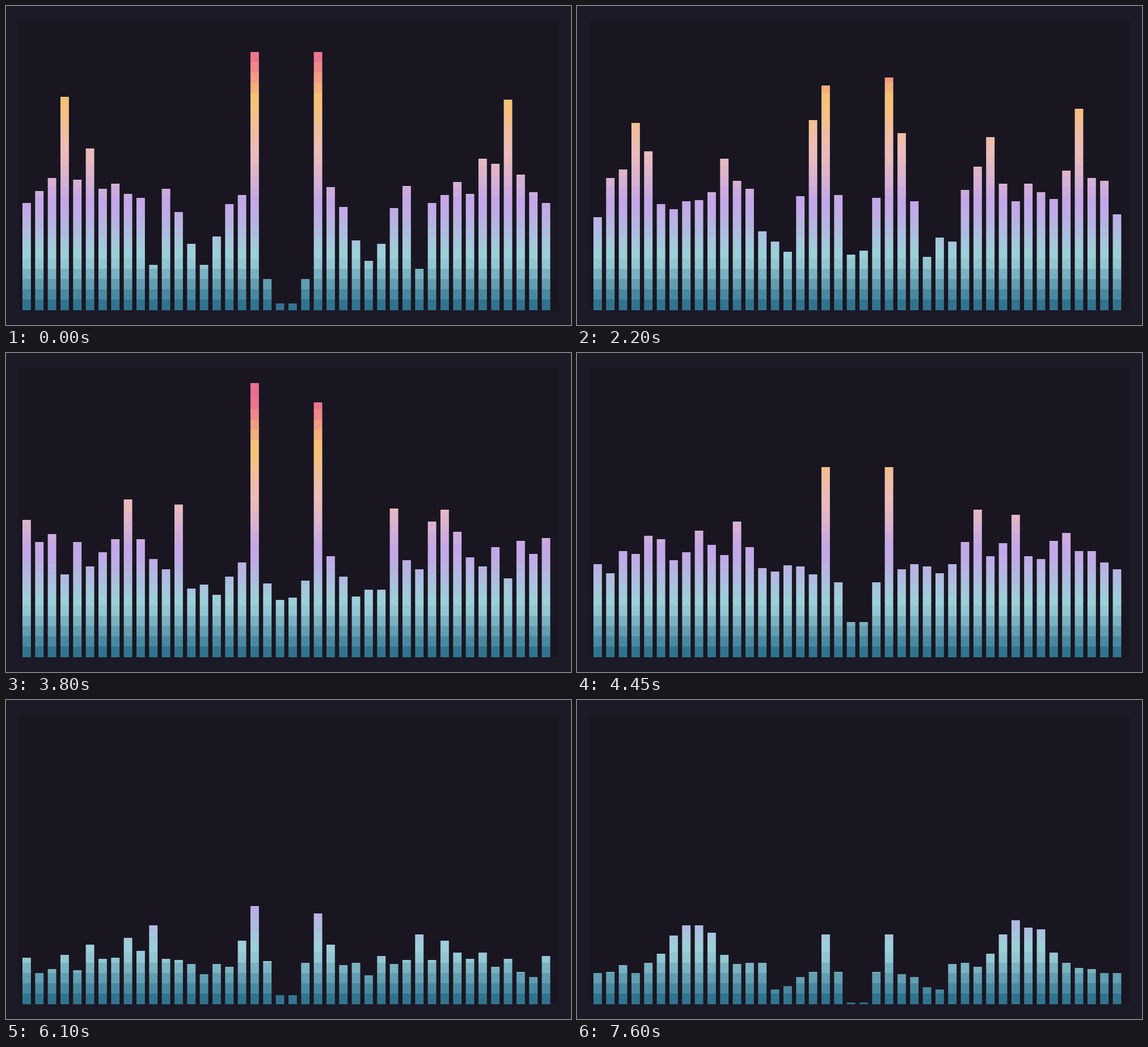
An HTML page with a canvas for the animation above (7650 ms loop, 996 by 562 pixels).

```html
<!DOCTYPE html>
<html lang="en">
<head>
<meta charset="utf-8">
<title>Spectrum</title>
<style>
html, body { margin: 0; height: 100%; overflow: hidden; background: #1b1a26; }
canvas { display: block; }
</style>
</head>
<body>
<canvas id="stage" width="996" height="562"></canvas>
<script>
const ctx = document.getElementById('stage').getContext('2d');
const LOOP = 7650, STEP = 50, BARS = 42, HALF = 21;
const FLOOR = 535.5, ROW = 18.2, ROWS = 28, EIGHTH = ROW / 8;

// A pose is a flat level with a dip in the low mids, a few bumps
// (band, height, width) and three bass bars. Bands run from treble to bass.
const poses = [
  { at: 0, level: 215, dip: 80, bass: [456, 54, 12], bumps: [[3, 370], [5, 270], [10, 82]] },
  { at: 1250, level: 230, dip: 150, bass: [424, 209, 31], bumps: [[3, 343], [9, 310, 1.3], [17, 316]] },
  { at: 3200, level: 185, dip: 75, bass: [366, 129, 156], bumps: [[0.5, 275, 0.9], [7.5, 340, 2], [12, 250]] },
  { at: 4450, level: 165, dip: 155, bass: [334, 133, 62], bumps: [[4, 235, 1.3], [8, 244, 0.8], [11, 264, 0.8]] },
  { at: 5400, level: 145, dip: 80, bass: [373, 257, 94], bumps: [[3, 296], [8, 320, 1], [10, 377], [17, 254]] },
  { at: 6900, level: 58, dip: 50, bass: [136, 38, 2], bumps: [[5, 95], [13, 100], [17, 109]] },
  { at: 7600, level: 60, dip: 22, bass: [122, 56, 2], bumps: [[7.5, 155, 2.3], [12.6, 100, 0.8]] }
];
const beats = [500, 1500, 2000, 3700, 5750];
const palette = [
  [49, 116, 143], [156, 207, 216], [196, 167, 231],
  [235, 188, 186], [246, 193, 119], [235, 111, 146]
];

const mix = (a, b, u) => a + (b - a) * u;
const clamp = (v, lo, hi) => Math.min(hi, Math.max(lo, v));
const smooth = u => u * u * (3 - 2 * u);
const bell = x => Math.exp(-x * x);

function hash(i, k) {
  const v = Math.sin(i * 127.1 + k * 311.7) * 43758.5453;
  return (v - Math.floor(v)) * 2 - 1;
}

function noise(i, t) {
  const p = t / 220, k = Math.floor(p);
  return mix(hash(i, k), hash(i, k + 1), smooth(p - k));
}

// Each colour leads to the next over five rows.
function rowColor(row) {
  const k = Math.min(Math.floor(row / 5), palette.length - 1);
  const next = palette[Math.min(k + 1, palette.length - 1)];
  return `rgb(${palette[k].map((c, j) => Math.round(mix(c, next[j], (row % 5) / 4.4)))})`;
}
const colors = Array.from({ length: ROWS }, (_, row) => rowColor(row));

const bandOf = i => Math.min(i, BARS - 1 - i);

function poseHeight({ at, level, dip, bass, bumps }, i) {
  const band = bandOf(i);
  if (band >= 18) return bass[band - 18];
  const height = [[14, dip, 1.8], ...bumps].reduce(
    (sum, [center, peak, width = 0.6]) => sum + (peak - level) * bell((band - center) / width),
    level);
  return height * (1 + 0.08 * hash(band, at) + 0.07 * hash(i + 50, at));
}

function barHeight(i, t) {
  const band = bandOf(i);
  const k = Math.min(poses.findLastIndex(p => p.at <= t), poses.length - 2);
  const [a, b] = [poses[k], poses[k + 1]];
  const u = (t - a.at) / (b.at - a.at);
  // A fade to quiet takes at most 950 ms.
  const fade = b.level < a.level / 2 ? Math.min(1, (t - a.at) / 950) : u;
  const base = mix(poseHeight(a, i), poseHeight(b, i), smooth(fade));
  const sway = Math.min(1, 2 * Math.sin(Math.PI * u)) *
    (0.3 * noise(band, t) + 0.12 * noise(i + 50, t));
  const kick = band === 18
    ? beats.reduce((sum, beat) => sum + 0.6 * bell((t - beat) / 130), 0) : 0;
  const eighths = Math.round(base * (1 + sway + kick) / EIGHTH);
  return clamp(eighths, 1, ROWS * 8) * EIGHTH;
}

function draw(t) {
  ctx.fillStyle = '#1b1a26';
  ctx.fillRect(0, 0, 996, 562);
  ctx.fillStyle = '#191622';
  ctx.fillRect(22, 27, 952, 509);
  for (let i = 0; i < BARS; i++) {
    const top = Math.round(FLOOR - barHeight(i, t));
    for (let row = 0; row < ROWS; row++) {
      const bottom = Math.round(FLOOR - row * ROW);
      if (bottom <= top) break;
      const y = Math.max(top, Math.round(FLOOR - (row + 1) * ROW));
      ctx.fillStyle = colors[row];
      ctx.fillRect(29 + i * 22.33, y, 14.9, bottom - y);
    }
  }
}

const start = performance.now();
function tick() {
  const t = (performance.now() - start) % LOOP;
  draw(Math.floor(t / STEP) * STEP);
  requestAnimationFrame(tick);
}
tick();
</script>
</body>
</html>
```
